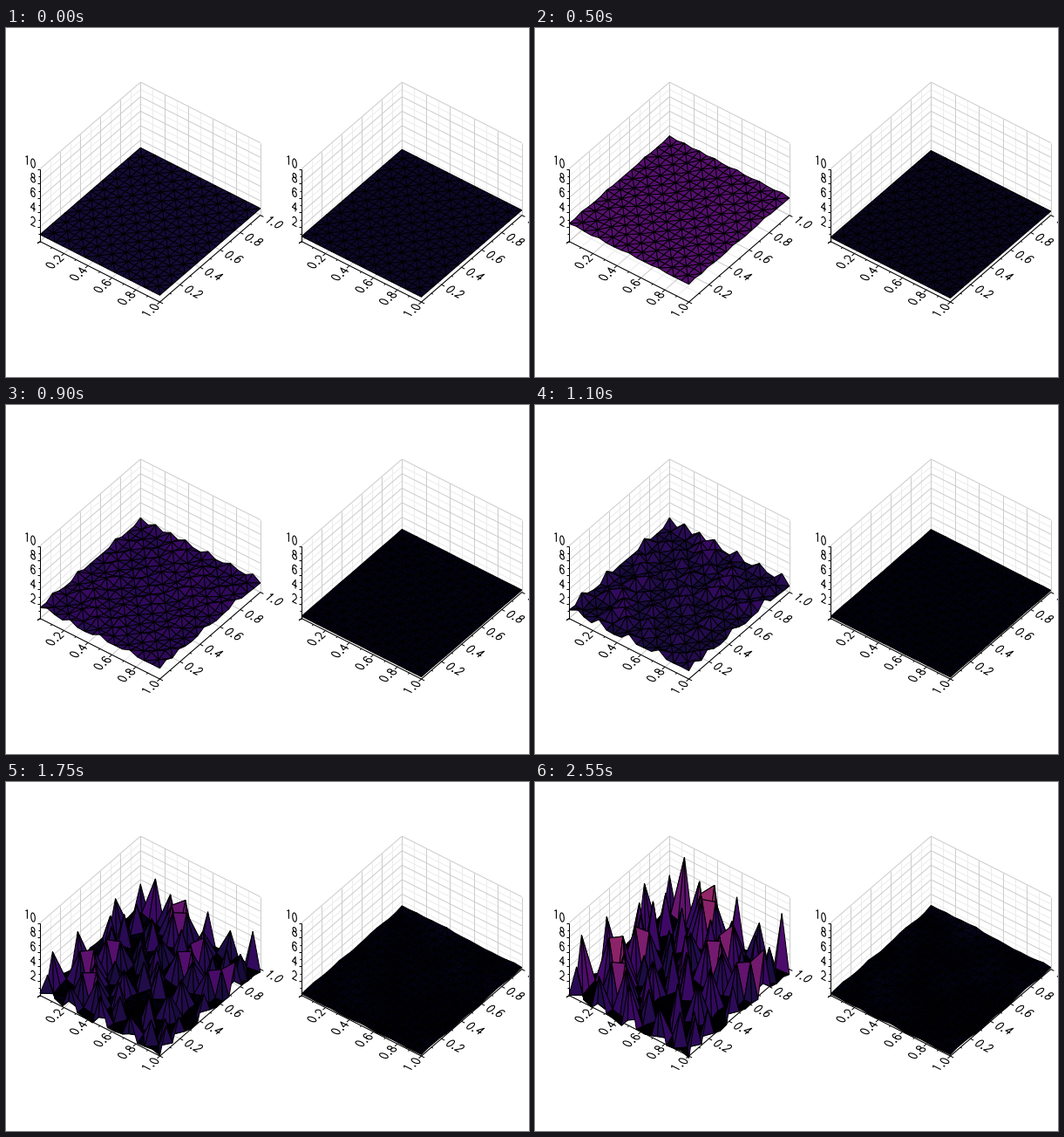
A matplotlib script for the animation above (2600 ms loop, 600 px wide and 400 px high).

```python
import numpy as np
import matplotlib.pyplot as plt
from matplotlib.animation import FuncAnimation
from matplotlib.collections import LineCollection, PolyCollection

W, H, DPI = 600, 400, 100
FRAMES, STEP = 52, 50
PX = 72 / DPI
N = 16

# Oblique view: pixel vectors of the unit axes
ORIGIN = np.array([39.0, 244.6])
EX = np.array([137.5, 69.5])
EY = np.array([115.3, -99.5])
EZ = np.array([0.0, -8.3])

fig = plt.figure(figsize=(W / DPI, H / DPI), dpi=DPI, facecolor="white")
ax = fig.add_axes([0, 0, 1, 1])
ax.set_xlim(0, W)
ax.set_ylim(H, 0)
ax.axis("off")


def project(x, y, z, shift=0):
    x, y, z = (np.asarray(v, float)[..., None] for v in (x, y, z))
    return ORIGIN + [shift, 0] + x * EX + y * EY + z * EZ


def unit(v):
    return v / np.hypot(*v)


# Stroke digits in a unit box, y upwards
def arc(cx, cy, rx, ry, start=0, stop=360):
    a = np.radians(np.linspace(start, stop, 25))
    return np.column_stack([cx + rx * np.cos(a), cy + ry * np.sin(a)])


GLYPHS = {
    "0": [arc(.5, .5, .33, .5)],
    "1": [np.array([(.27, .8), (.55, 1), (.55, 0)])],
    "2": [np.vstack([arc(.5, .7, .31, .3, 170, -35), [(.15, 0), (.85, 0)]])],
    "4": [np.array([(.65, 0), (.65, 1), (.13, .32), (.9, .32)])],
    "6": [arc(.5, .31, .32, .31),
          np.vstack([arc(.55, .6, .37, .4, 40, 180), [(.18, .31)]])],
    "8": [arc(.5, .76, .28, .24), arc(.5, .27, .34, .27)],
    ".": [arc(.5, .06, .09, .05)],
}
ADVANCE = 7.8


def label(text, center, along, up, height=10):
    widths = [4.2 if c == "." else ADVANCE for c in text]
    pen = -sum(widths) / 2
    lines = []
    for c, w in zip(text, widths):
        for g in GLYPHS[c]:
            lines.append(center + np.outer(pen + g[:, 0] * w, along)
                         + np.outer((g[:, 1] - .5) * height, up))
        pen += w
    return lines


def add_lines(lines, color, width, order):
    ax.add_collection(LineCollection(lines, colors=color, zorder=order,
                                     linewidths=width * PX, capstyle="butt"))


def draw_box(shift):
    def seg(a, b):
        return project(*zip(a, b), shift)

    grid = {True: [], False: []}
    ticks, texts = [], []
    dx, dy = unit(EX), unit(EY)
    for k in range(11):
        t, major = k / 10, k % 2 == 0
        grid[major] += [
            seg((0, t, 0), (0, t, 10)), seg((t, 1, 0), (t, 1, 10)),
            seg((0, 0, k), (0, 1, k)), seg((0, 1, k), (1, 1, k)),
            seg((t, 0, 0), (t, 1, 0)), seg((0, t, 0), (1, t, 0)),
        ]
        size = 4 if major else 2
        px, py, pz = (project(*p, shift)
                      for p in ((t, 0, 0), (1, t, 0), (0, 0, k)))
        ticks += [[px, px - dy * size], [py, py + dx * size],
                  [pz, pz - [size * .8, 0]]]
        if major and k:
            name = f"{t:.1f}"
            texts += label(name, px - dy * 14.6, dy, -dx)
            texts += label(name, py + dx * 17.8, dx, dy)
            inset = 7.8 + (len(str(k)) - 1) * ADVANCE / 2
            texts += label(str(k), pz - dx * inset + [-1, -3],
                           dx, np.array([0, -1]))
    ticks += [seg((0, 0, 0), (0, 0, 10)), seg((0, 0, 0), (1, 0, 0)),
              seg((1, 0, 0), (1, 1, 0))]
    add_lines(grid[False], "#ececec", 1, 1)
    add_lines(grid[True], "#cccccc", 1, 2)
    add_lines(ticks, "black", 1, 3)
    add_lines(texts, "black", 1.1, 3)


# Mesh with alternating diagonals, sorted back to front
def make_mesh():
    tris = []
    for i in range(N):
        for j in range(N):
            a, b, c, d = (i, j), (i + 1, j), (i + 1, j + 1), (i, j + 1)
            if (i + j) % 2 == 0:
                tris += [(a, b, c), (a, c, d)]
            else:
                tris += [(a, b, d), (b, c, d)]
    tris.sort(key=lambda t: sum(i - j for i, j in t))
    return np.array(tris)


TRIS = make_mesh()
TI, TJ = TRIS[..., 0], TRIS[..., 1]

# Tall spikes that shape the skyline
SKYLINE = [(0, 2), (0, 6), (0, 12), (2, 16), (6, 16), (9, 16), (15, 16)]


def neighbours(a, mode):
    p = np.pad(a, 1, mode=mode)
    return p[:-2, 1:-1], p[2:, 1:-1], p[1:-1, :-2], p[1:-1, 2:]


# Spikes stand on the local maxima of a random field, the rest sinks
def make_pattern(rng):
    shape = (N + 1, N + 1)
    field = rng.random(shape)
    rows, cols = zip(*SKYLINE)
    field[rows, cols] = 2
    peak = field > np.max(neighbours(field, "constant"), axis=0)
    pattern = np.where(peak, rng.uniform(3.5, 6, shape), rng.uniform(.1, .5, shape))
    pattern[rows, cols] = rng.uniform(6.3, 7.3, len(rows))
    pattern[2, 16] = 8.2
    dips = np.where(peak, 0, rng.uniform(0, .9, shape))
    return pattern, dips


def smooth(a):
    return (a + sum(neighbours(a, "edge"))) / 5


pattern, dips = make_pattern(np.random.default_rng(7))
ripple = smooth(smooth(pattern))
ripple -= ripple.mean()


def heights(n):
    """Flat burst that relaxes while the spike pattern takes over."""
    start = np.exp(-2.5 * n)
    level = 1.22 + 4.7 * np.exp(-.129 * n) * (1 - start) - .27 * start
    grow = 1 / (1 + np.exp((30 - n) / 5.2))
    left = (level - .2 * grow) * pattern ** grow - dips * grow
    right = .1 + level ** 2 / 14 + .54 * start + .2 * grow * ripple
    return left, right


def make_surface():
    surface = PolyCollection([], edgecolors="black", linewidths=PX, zorder=5,
                             joinstyle="bevel")
    ax.add_collection(surface)
    return surface


SHIFTS = (0, 300)
for s in SHIFTS:
    draw_box(s)
surfaces = [make_surface() for _ in SHIFTS]
cmap = plt.get_cmap("inferno")


def update(n):
    for surface, z, s in zip(surfaces, heights(n), SHIFTS):
        tz = z[TI, TJ]
        surface.set_verts(project(TI / N, TJ / N, tz, s))
        surface.set_facecolor(cmap(tz.mean(axis=1) / 10))
    return surfaces


anim = FuncAnimation(fig, update, frames=FRAMES, interval=STEP,
                     repeat=True, repeat_delay=0, blit=False)
plt.show()
```
